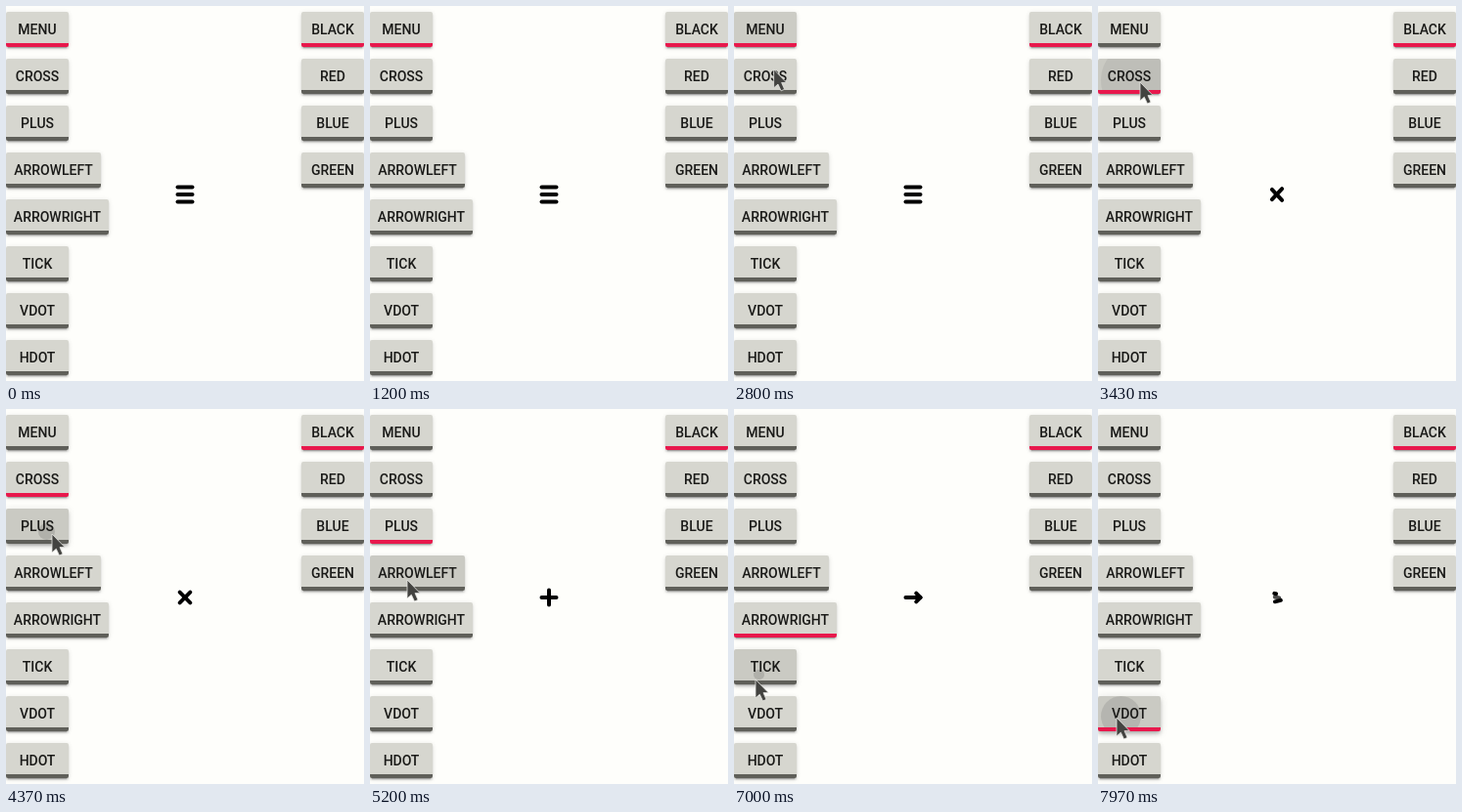
Write an HTML page that moves like this. It is 366 by 384 pixels and loops after 8000 ms.

```html
<!DOCTYPE html>
<html lang="en">
<head>
<meta charset="utf-8">
<title>Morphing icon</title>
<style>
html, body { margin: 0; width: 100%; height: 100%; overflow: hidden; background: #fefefb; }
.btn {
  position: absolute; height: 36px; border-radius: 2px; overflow: hidden;
  font: 500 14px/36px Roboto, sans-serif; text-align: center; color: #1a1a18;
}
.btn span { position: relative; white-space: nowrap; }
.btn i { position: absolute; border-radius: 50%; background: #606060; }
.btn b { position: absolute; left: 0; bottom: 0; width: 100%; height: 4px; }
svg { position: absolute; left: 0; top: 0; }
</style>
</head>
<body>
<svg width="366" height="384">
  <g id="icon" transform="translate(183 193)" stroke="#000" stroke-width="4" stroke-linecap="round"></g>
  <path id="cursor" d="M0 0V19L4.3 15.2L7.5 22L11 20.4L8 13.6H13.2Z" fill="#434340" stroke="#e8e8e4" stroke-width=".8"/>
</svg>
<script>
const LOOP = 8000, HOLD = 105;
const RED = '#e8184c', GREY = '#5f5f59';

const clamp = v => Math.max(0, Math.min(1, v));
const lerp = (a, b, k) => a + (b - a) * k;
const ease = k => k * k * (3 - 2 * k);
const ramp = (t, from, to) => ease(clamp((t - from) / 200)) - ease(clamp((t - to) / 200));
const spring = ms => {
  const x = ms / 100;
  return 1 - Math.exp(-x) * (Math.cos(x) + Math.sin(x));
};

// Three bars: two mirrored about the x axis and one in the middle
const bar = (x, y, angle, len, alpha = 1) => ({ x, y, angle, len, alpha });
const shape = (x, y, top, bottom, len, mid) =>
  [bar(x, -y, top, len), mid, bar(x, y, bottom, len)];
const FULL = bar(0, 0, 0, 15), NONE = bar(0, 0, 0, 15, 0), DOT = bar(0, 0, 0, 0);
const icons = [
  shape(0, 7.5, 0, 0, 15, FULL),                                    // menu
  shape(0, 0, 45, -45, 15, NONE),                                   // cross
  shape(0, 0, 180, 90, 15, NONE),                                   // plus
  shape(-5.4, 2.2, 135, 45, 6, FULL),                               // arrow left
  shape(5.4, 2.2, 225, -45, 6, FULL),                               // arrow right
  [bar(-6, 2, 225, 6), bar(0, 0, 45, 15, 0), bar(3, -3, -45, 20)],  // tick
  shape(0, 6.5, 180, 0, 0, DOT)                                     // vertical dots
];

// The pointer visits each button in turn, a little quicker every time
const pressTime = i => i ? 3000 + 1270 * (i - 1) ** .817 : 2300;
const stops = [[34, 28], [43, 78], [47, 128], [38, 175], [26, 225], [22, 277], [19, 316]];
const ENTRY = { from: 1700, to: 2180, x: 150, y: 400 };

// Travel towards stop i
function trip(i) {
  if (i === 0) return ENTRY;
  const start = pressTime(i - 1), gap = pressTime(i) - start;
  return { from: start + .45 * gap, to: start + .85 * gap, x: stops[i - 1][0], y: stops[i - 1][1] };
}
const middle = i => (trip(i).from + trip(i).to) / 2;
const visits = stops.map(([x, y], i) => ({
  x, y, ...(i ? { down: pressTime(i) } : { down: Infinity }),
  enter: middle(i),
  leave: i + 1 < stops.length ? middle(i + 1) : Infinity
}));

function pointer(t) {
  let i = stops.length - 1;
  while (i > 0 && trip(i).from > t) i--;
  const { from, to, x, y } = trip(i);
  const k = ease(clamp((t - from) / (to - from)));
  return [lerp(x, stops[i][0], k), lerp(y, stops[i][1], k)];
}

function addButton(label, x, row) {
  const el = document.createElement('div');
  const y = 6 + row * 48;
  const w = { ARROWLEFT: 97, ARROWRIGHT: 105 }[label] || 64;
  el.className = 'btn';
  el.style.cssText = `left:${x}px;top:${y}px;width:${w}px`;
  el.innerHTML = `<i></i><span>${label}</span><b></b>`;
  document.body.insertBefore(el, document.querySelector('svg'));
  return { el, x, y, w, ripple: el.children[0], line: el.children[2] };
}

const left = 'MENU CROSS PLUS ARROWLEFT ARROWRIGHT TICK VDOT HDOT'.split(' ')
  .map((label, row) => addButton(label, 0, row));
const right = 'BLACK RED BLUE GREEN'.split(' ')
  .map((label, row) => addButton(label, 302, row));

const iconEl = document.getElementById('icon');
const cursor = document.getElementById('cursor');
const lines = icons[0].map(() =>
  iconEl.appendChild(document.createElementNS('http://www.w3.org/2000/svg', 'line')));

function paintRipple(b, t, visit) {
  const age = visit ? t - visit.down : -1;
  const alpha = age < 0 ? 0 : .25 * (1 - clamp((age - HOLD) / 600));
  const r = Math.max(0, .085 * age);
  b.ripple.style.opacity = alpha;
  if (!alpha) return;
  const x = lerp(visit.x - b.x, b.w / 2, .35), y = lerp(visit.y - b.y, 18, .35);
  Object.assign(b.ripple.style, {
    left: x - r + 'px', top: y - r + 'px', width: 2 * r + 'px', height: 2 * r + 'px'
  });
}

function paintButton(b, active, t, visit) {
  const hover = visit ? ramp(t, visit.enter, visit.leave) : 0;
  const press = visit ? ramp(t, visit.down, visit.down + HOLD + 80) : 0;
  const c = [214, 214, 207].map(v => Math.round(v - 12 * hover));
  b.el.style.background = `rgb(${c})`;
  b.el.style.boxShadow =
    `0 ${2 + 2 * press}px ${2 + 3 * press}px rgba(0,0,0,.14),` +
    `0 ${3 - press}px ${1 + 3 * press}px ${press - 2}px rgba(0,0,0,.2),` +
    `0 1px ${5 + 5 * press}px rgba(0,0,0,.12)`;
  b.line.style.background = active ? RED : GREY;
  paintRipple(b, t, visit);
}

function paintIcon(t, n) {
  const from = icons[Math.max(0, n - 1)], to = icons[n];
  const k = n ? spring(t - pressTime(n) - HOLD) : 1;
  lines.forEach((line, i) => {
    const mix = key => lerp(from[i][key], to[i][key], k);
    const half = Math.max(.01, mix('len') / 2);
    line.setAttribute('x1', -half);
    line.setAttribute('x2', half);
    line.setAttribute('transform', `translate(${mix('x')} ${mix('y')}) rotate(${mix('angle')})`);
    line.setAttribute('opacity', clamp(mix('alpha')));
  });
}

function draw(t) {
  const current = visits.filter(v => v.down + HOLD <= t).length;
  left.forEach((b, i) => paintButton(b, i === current, t, visits[i]));
  right.forEach((b, i) => paintButton(b, i === 0, t));
  paintIcon(t, current);
  cursor.setAttribute('transform', `translate(${pointer(t)})`);
}

const start = performance.now();
function tick(now) {
  draw(Math.max(0, now - start) % LOOP);
  requestAnimationFrame(tick);
}
draw(0);
requestAnimationFrame(tick);
</script>
</body>
</html>
```
